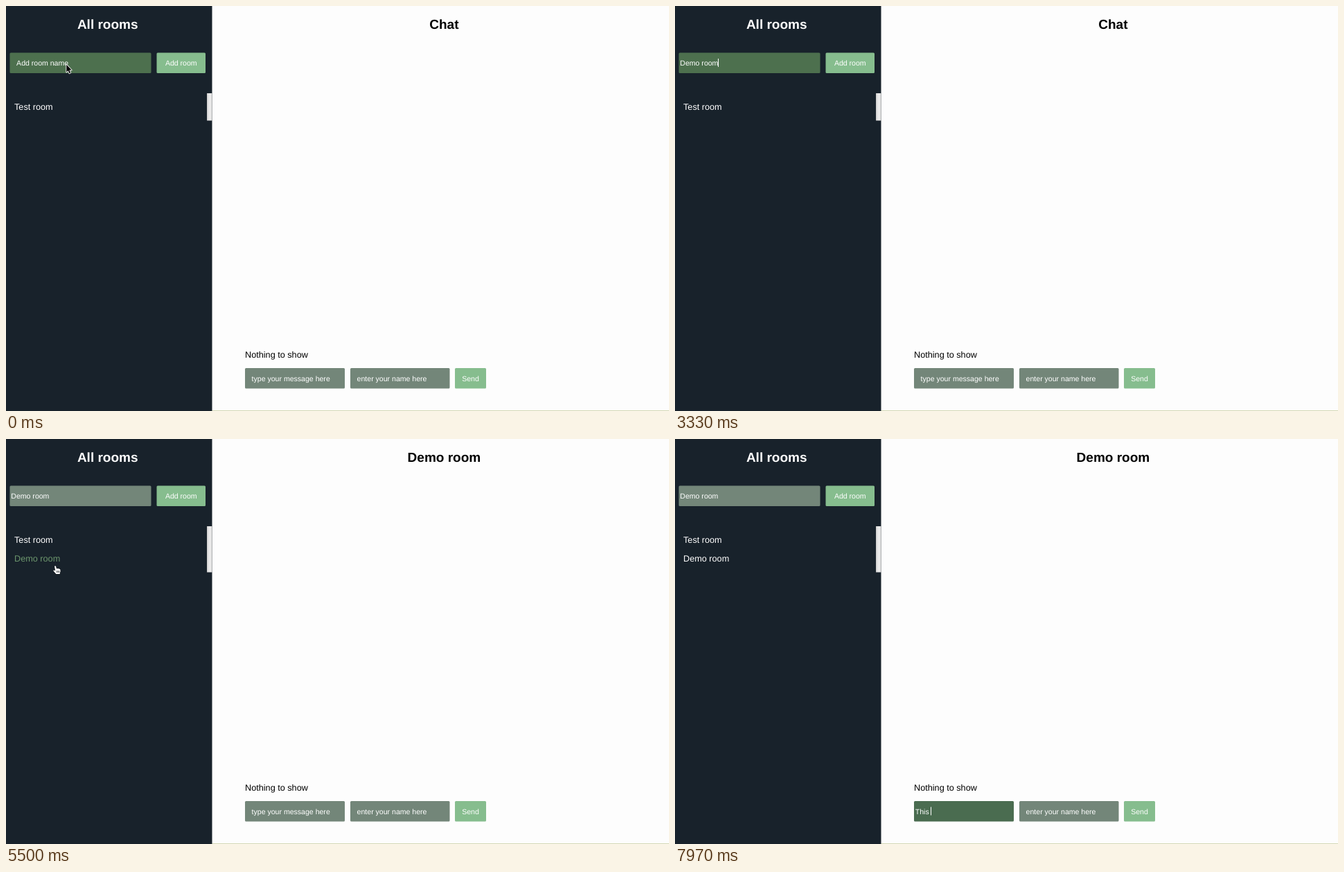
An HTML page with a canvas that plays this animation: 957 px wide and 585 px high, repeating every 8000 ms.

```html
<!DOCTYPE html>
<html lang="en">
<head>
<meta charset="utf-8">
<title>Chat rooms</title>
<style>
  html, body { margin: 0; width: 100%; height: 100%; overflow: hidden; background: #fdfdfd; }
  canvas { display: block; }
</style>
</head>
<body>
<canvas id="stage" width="957" height="585"></canvas>
<script>
const ctx = document.getElementById('stage').getContext('2d');
const LOOP = 8000;
const FONT = '"Liberation Sans", Arial, sans-serif';
const BODY = 12.68, SMALL = 10.56;
const COLOR = {
  side: '#18222b', page: '#fdfdfd', field: '#738679', roomFocus: '#4d704e',
  msgFocus: '#4a6c50', button: '#86bd8e', pressed: '#749f7a', link: '#6c966d'
};

// Moments of the session, in ms
const ROOM_KEYS = [1900, 2060, 2220, 2380, 2520, 2680, 2840, 2990, 3150];
const MSG_KEYS = [7240, 7390, 7520, 7680, 7840];
const ADDED = 4060, OPENED = 5050, MSG_CLICK = 6340;
const SHOW = 3470;

// Pointer stops: time, x, y
const PATH = [
  [0, 86.5, 83.5], [3470, 86.5, 83.5], [3920, 246, 84], [4200, 246, 84],
  [4620, 52.5, 180.5], [5000, 52.5, 180.5], [5400, 71, 183],
  [5640, 71, 183], [6240, 402.5, 545], [8000, 402.5, 545]
];

function pointerAt(t) {
  const i = Math.max(1, PATH.findIndex(p => p[0] >= t));
  const [t0, x0, y0] = PATH[i - 1], [t1, x1, y1] = PATH[i];
  const u = (t - t0) / (t1 - t0), k = u * u * (3 - 2 * u);
  return { x: x0 + (x1 - x0) * k, y: y0 + (y1 - y0) * k };
}

const typed = (word, keys, t) => word.slice(0, keys.filter(k => k <= t).length);
const inside = (p, x, y, w, h) => p.x >= x && p.x <= x + w && p.y >= y && p.y <= y + h;

function text(str, x, y, size, color = '#fff', align = 'left', weight = '') {
  ctx.font = `${weight} ${size}px ${FONT}`;
  ctx.textAlign = align;
  ctx.fillStyle = color;
  ctx.fillText(str, x, y);
}

function box(x, y, w, h, color) {
  ctx.fillStyle = color;
  ctx.beginPath();
  ctx.roundRect(x, y, w, h, 1.5);
  ctx.fill();
}

function field(x, y, w, color, value, hint, caret) {
  box(x, y, w, 29.5, color);
  if (value) text(value, x + 1.8, y + 18.5, SMALL);
  else text(hint, x + 9.6, y + 18.5, SMALL);
  if (caret) {
    ctx.font = `${SMALL}px ${FONT}`;
    ctx.fillStyle = '#fff';
    ctx.fillRect(Math.round(x + 1.4 + ctx.measureText(value).width), y + 8.5, 1, 12);
  }
}

function button(label, x, y, w, color) {
  box(x, y, w, 29.5, color);
  text(label, x + w / 2, y + 18.5, SMALL, '#fff', 'center');
}

function outline(path, fill, stroke, width) {
  ctx.lineJoin = 'round';
  ctx.lineWidth = width;
  ctx.strokeStyle = stroke;
  ctx.stroke(path);
  ctx.fillStyle = fill;
  ctx.fill(path);
}

const ARROW = new Path2D('M.8 1.2V12L3.2 9.8 5 13.8 6.7 13 4.9 9.1H8.2Z');
const HAND = new Path2D('M-1 .8Q0-.3 1 .8L2 4.4 3.3 3.7 4.3 4.5 5.5 4.1 6.3 5 7.2 5Q8.2 8 6.8 10.2V12H1.3L-2.6 7.6Q-2.7 6.2-1.3 6.4L.2 7.4Z');
const BEAM = new Path2D('M-2.5-6.5Q0-6.5 0-5V5Q0 6.5-2.5 6.5M2.5-6.5Q0-6.5 0-5M0 5Q0 6.5 2.5 6.5M-1.5 2.5H1.5');

function drawPointer(p, t) {
  const overButton = inside(p, 217, 67, 71, 30) || inside(p, 648, 523, 45, 30);
  const overRoom = inside(p, 8, 134, 80, 56);
  const overField = inside(p, 5, 67, 204, 30) || inside(p, 345, 523, 296, 30);
  ctx.save();
  ctx.translate(p.x, p.y);
  if (overButton || overRoom) {
    outline(HAND, '#fff', '#10161b', 1.2);
    ctx.lineWidth = .7;
    ctx.beginPath();
    for (const x of [2.4, 4, 5.6]) { ctx.moveTo(x, 7.2); ctx.lineTo(x, 10); }
    ctx.stroke();
  } else if (overField && t > SHOW + 60) {
    ctx.lineCap = 'round';
    ctx.lineWidth = 2.4;
    ctx.strokeStyle = '#e4e8e4';
    ctx.stroke(BEAM);
    ctx.lineWidth = 1.1;
    ctx.strokeStyle = '#1b241d';
    ctx.stroke(BEAM);
  } else {
    outline(ARROW, '#050505', '#f4f4f4', 1.8);
  }
  ctx.restore();
}

function scrollbar(h) {
  const g = ctx.createLinearGradient(290, 0, 297.5, 0);
  g.addColorStop(0, '#c9c9c9');
  g.addColorStop(.25, '#e2e2e2');
  g.addColorStop(.6, '#ececec');
  g.addColorStop(1, '#d8d8d8');
  ctx.fillStyle = g;
  ctx.fillRect(290, 126, 7.5, h);
}

function draw(t) {
  const added = t >= ADDED, opened = t >= OPENED;
  const onButton = t >= ADDED - 80 && !opened;
  const onRoom = t < ADDED - 80, onMsg = t >= MSG_CLICK;
  const room = typed('Demo room', ROOM_KEYS, t);
  const msg = typed('This ', MSG_KEYS, t);

  ctx.fillStyle = COLOR.page;
  ctx.fillRect(0, 0, 957, 585);
  ctx.fillStyle = '#d3d8b4';
  ctx.fillRect(297.5, 584, 660, 1);
  ctx.fillStyle = COLOR.side;
  ctx.fillRect(0, 0, 297.5, 585);

  text('All rooms', 146.7, 33, 19, '#fff', 'center', 'bold');
  text(opened ? 'Demo room' : 'Chat', 632.4, 33, 19, '#000', 'center', 'bold');

  const roomCaret = onRoom && (t < ROOM_KEYS[0] ? t % 1000 >= 500 : t < 3650);
  field(5.5, 67.5, 204, onRoom ? COLOR.roomFocus : COLOR.field, room, 'Add room name', roomCaret);
  button('Add room', 217.5, 67.5, 70.5, onButton ? COLOR.pressed : COLOR.button);

  scrollbar(added ? 66.5 : 39.5);
  text('Test room', 12, 150, BODY);
  if (added) text('Demo room', 12, 177, BODY, opened && !onMsg ? COLOR.link : '#fff');

  text('Nothing to show', 345, 507.5, BODY, '#000');
  const msgCaret = onMsg && (t >= MSG_KEYS[0] || (t - MSG_CLICK) % 1000 < 500);
  field(345, 523, 144, onMsg ? COLOR.msgFocus : COLOR.field, msg, 'type your message here', msgCaret);
  field(497, 523, 143.5, COLOR.field, '', 'enter your name here', false);
  button('Send', 648, 523, 45, COLOR.button);

  // The pointer hides while keys are pressed
  const hidden = (t >= ROOM_KEYS[0] && t < SHOW) || t >= MSG_KEYS[0];
  if (!hidden) drawPointer(pointerAt(t), t);
}

ctx.textRendering = 'geometricPrecision';
const start = performance.now();
function tick() {
  draw((performance.now() - start) % LOOP);
  requestAnimationFrame(tick);
}
tick();
</script>
</body>
</html>
```
